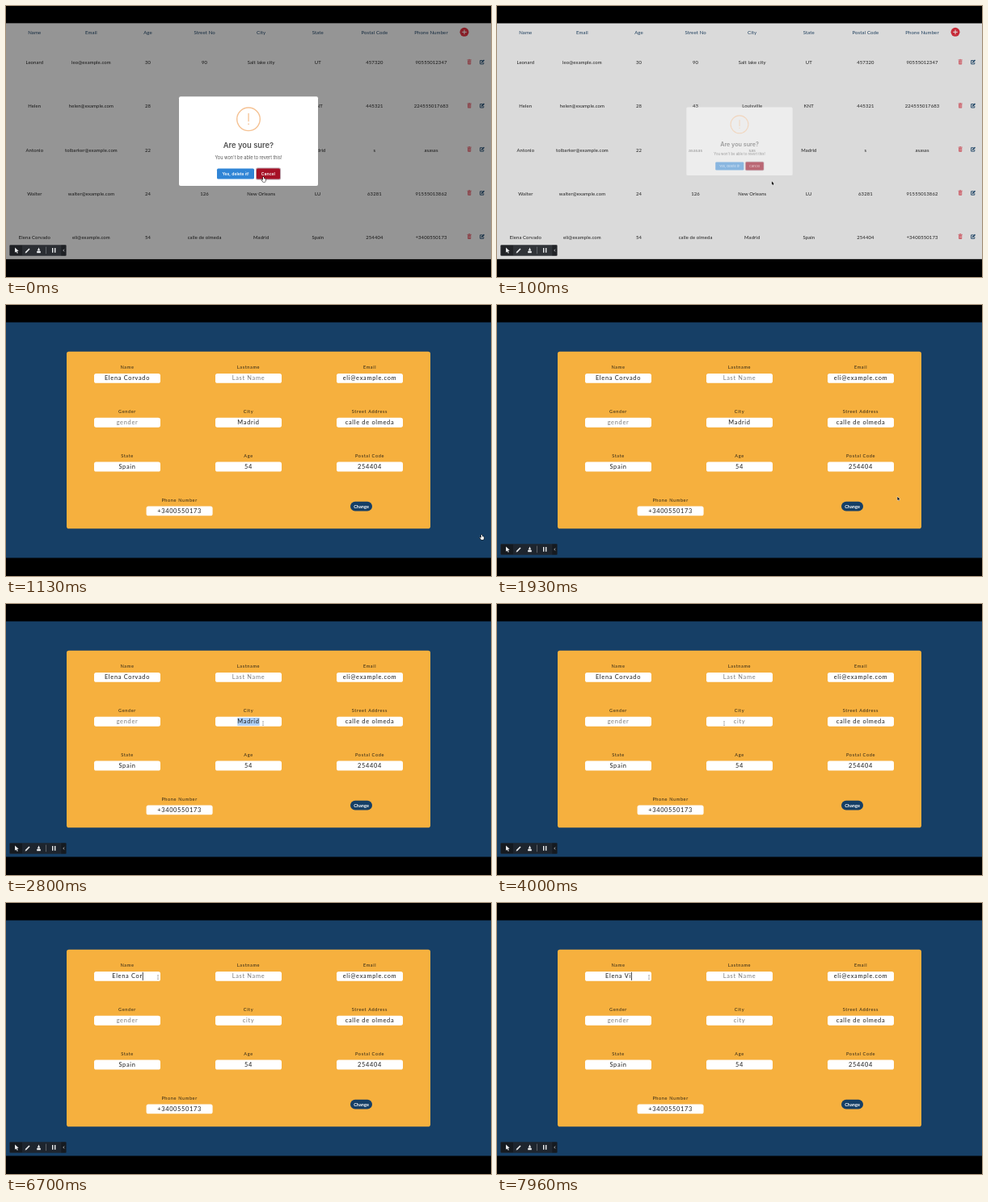
These frames come from a looping animation (600x336 px, 8 s). An HTML page with a canvas:

```html
<!DOCTYPE html>
<html lang="en">
<head>
<meta charset="utf-8">
<title>Contact list and edit form</title>
<style>
html, body { margin: 0; width: 100%; height: 100%; overflow: hidden; background: #000; }
canvas { display: block; width: 600px; height: 336px; }
</style>
</head>
<body>
<canvas id="stage"></canvas>
<script>
const LOOP = 8000, W = 600, H = 336;
const SANS = 'Lato, "Open Sans", sans-serif';
const UI = 'Inter, Roboto, sans-serif';
const NAVY = '#163f66', RED = '#e0303f', PAPER = '#f7f7f7';

const MODAL_OUT = 30, PAGE = 950, TOOLBAR_IN = 1500;
const SELECT = 2640, CLEAR = 3300, FOCUS_NAME = 5850;
const ERASE = 6250, ERASE_STEP = 115, TYPE = [7620, 7840];

const HEAD = ['Name', 'Email', 'Age', 'Street No', 'City', 'State', 'Postal Code', 'Phone Number'];
const PERSON = 'Elena Corvado', KEPT = 'Elena ', ADDED = 'Vi';
const MAIL = 'eli@example.com', STREET = 'calle de olmeda', PHONE = '+3400550173';
const ROWS = [
  ['Leonard', 'leo@example.com', '30', '90', 'Salt lake city', 'UT', '457320', '90555012347'],
  ['Helen', 'helen@example.com', '28', '43', 'Louisville', 'KNT', '445321', '224555017683'],
  ['Antonio', 'tolbarker@example.com', '22', 'asasas', 'sas', 'Madrid', 's', 'asasas'],
  ['Walter', 'walter@example.com', '24', '126', 'New Orleans', 'LU', '63281', '91555013862'],
  [PERSON, MAIL, '54', STREET, 'Madrid', 'Spain', '254404', PHONE]
];

// time, x, y of the pointer
const PATH = [
  [0, 318, 213], [30, 318, 213], [160, 358, 221], [480, 490, 257], [800, 588, 286],
  [1540, 588, 286], [1700, 571, 277], [2100, 440, 209], [2500, 318, 148],
  [3350, 318, 148], [3850, 281, 148], [4650, 281, 148], [5400, 183, 91],
  [6000, 183, 91], [6450, 188, 92], [8000, 188, 92]
];

const canvas = document.getElementById('stage');
const dpr = window.devicePixelRatio || 1;
canvas.width = W * dpr;
canvas.height = H * dpr;
const ctx = canvas.getContext('2d');

const clamp = v => Math.max(0, Math.min(1, v));

function rect(x, y, w, h, color) {
  ctx.fillStyle = color;
  ctx.fillRect(x, y, w, h);
}

function round(x, y, w, h, r, color) {
  ctx.fillStyle = color;
  ctx.beginPath();
  ctx.roundRect(x, y, w, h, r);
  ctx.fill();
}

function disc(x, y, r, color) {
  ctx.fillStyle = color;
  ctx.beginPath();
  ctx.arc(x, y, r, 0, Math.PI * 2);
  ctx.fill();
}

function trace(points, close) {
  ctx.beginPath();
  points.forEach(([x, y], i) => i ? ctx.lineTo(x, y) : ctx.moveTo(x, y));
  if (close) ctx.closePath();
}

function stroke(points, color, width, close) {
  trace(points, close);
  ctx.strokeStyle = color;
  ctx.lineWidth = width;
  ctx.stroke();
}

function shape(points, color) {
  trace(points, true);
  ctx.fillStyle = color;
  ctx.fill();
}

// Text centred on x, with its capitals centred on y; returns its width.
function text(str, x, y, size, color, { weight = 400, gap = 0, font = SANS } = {}) {
  ctx.font = `${weight} ${size}px ${font}`;
  ctx.letterSpacing = gap + 'px';
  ctx.textAlign = 'left';
  const w = ctx.measureText(str).width;
  ctx.fillStyle = color;
  ctx.fillText(str, x - w / 2, y + size * 0.36);
  return w;
}

function drawTrash(x, y) {
  const c = '#e4606c';
  round(x - 2, y - 1.9, 4, 5, 0.7, c);
  rect(x - 2.6, y - 2.9, 5.2, 0.8, c);
  rect(x - 0.9, y - 3.5, 1.8, 0.7, c);
  for (const d of [-1, 0, 1]) rect(x + d - 0.2, y - 1.1, 0.4, 3.3, '#fbdfe1');
}

function drawEdit(x, y) {
  const c = '#1f4a70';
  stroke([[x + 0.6, y - 1.9], [x - 2.4, y - 1.9], [x - 2.4, y + 2.5], [x + 1.8, y + 2.5], [x + 1.8, y + 0.5]], c, 0.9);
  stroke([[x - 0.8, y + 0.9], [x + 2.5, y - 2.4]], c, 1.5);
}

function drawTable() {
  rect(0, 21.5, W, 292.3, PAPER);
  HEAD.forEach((h, i) => text(h, 35.3 + i * 70.1, 32.5, 6, '#1f4568', { gap: 0.13 }));
  disc(567, 32.3, 5.5, RED);
  rect(564.2, 31.8, 5.6, 1, '#fff');
  rect(566.5, 29.5, 1, 5.6, '#fff');
  ROWS.forEach((row, r) => {
    const y = 70.2 + r * 54.1;
    row.forEach((cell, i) => text(cell, 35.3 + i * 70.1, y, 5.9, '#222', { gap: 0.13 }));
    drawTrash(573.2, y - 0.8);
    drawEdit(589, y - 0.8);
  });
}

function drawModal(t) {
  const p = clamp((t - MODAL_OUT) / 150);
  const shade = 0.4 * (1 - clamp((t - MODAL_OUT) / 100));
  rect(0, 21.5, W, 292.3, `rgba(0,0,0,${shade})`);
  if (p >= 1) return;
  ctx.save();
  ctx.globalAlpha = 1 - p;
  ctx.translate(300, 167.7);
  ctx.scale(1 - p / 2, 1 - p / 2);
  ctx.translate(-300, -167.7);
  round(214, 112.3, 172, 110.7, 2, '#fff');
  ctx.strokeStyle = '#f5c294';
  ctx.lineWidth = 1.4;
  ctx.beginPath();
  ctx.arc(300, 140.3, 14.3, 0, Math.PI * 2);
  ctx.stroke();
  rect(299.4, 133, 1.3, 10.3, '#f5c294');
  disc(300.05, 146.3, 0.85, '#f5c294');
  const ui = weight => ({ weight, font: UI });
  text('Are you sure?', 300, 172.8, 9.4, '#545454', ui(600));
  text("You won't be able to revert this!", 300, 188, 5.55, '#545454', ui(400));
  round(261, 201.6, 46, 13, 1.6, '#3085d6');
  round(309, 200.6, 31, 15, 2.2, '#b9a3ad');
  round(310, 201.6, 29, 13, 1.6, '#a61126');
  text('Yes, delete it!', 284, 208.1, 5.1, '#fff', ui(600));
  text('Cancel', 324.4, 208.1, 5.1, '#fff', ui(600));
  ctx.restore();
}

function drawCaret(x, y, since) {
  if (since % 1000 < 500) rect(x, y - 5, 0.8, 10, '#111');
}

function drawField(label, value, x, y, hint) {
  text(label, x, y - 13.4, 5.6, '#2b2314', { gap: 0.6 });
  round(x - 41, y - 5.9, 82, 11.9, 2.6, '#fff');
  return text(value || hint, x, y, 7.4, value ? '#1c1c1c' : '#7d7d7d', { gap: 0.7 });
}

function nameAt(t) {
  const extra = PERSON.length - KEPT.length;
  const gone = t < ERASE ? 0 : Math.min(extra, 1 + Math.floor((t - ERASE) / ERASE_STEP));
  const typed = TYPE.filter(at => t >= at).length;
  return PERSON.slice(0, PERSON.length - gone) + ADDED.slice(0, typed);
}

function lastNameKey(t) {
  const keys = [FOCUS_NAME, ...TYPE];
  for (let i = 0; i < PERSON.length - KEPT.length; i++) keys.push(ERASE + i * ERASE_STEP);
  return Math.max(...keys.filter(k => k <= t));
}

function drawForm(t) {
  rect(0, 21.5, W, 292, NAVY);
  round(75, 57.7, 450, 219.5, 2.8, '#f6b03e');
  const nameW = drawField('Name', nameAt(t), 150, 90.8);
  drawField('Lastname', '', 300, 90.8, 'Last Name');
  drawField('Email', MAIL, 450, 90.8);
  drawField('Gender', '', 150, 145.7, 'gender');
  const cityW = drawField('City', t < CLEAR ? 'Madrid' : '', 300, 145.7, 'city');
  drawField('Street Address', STREET, 450, 145.7);
  drawField('State', 'Spain', 150, 200.5);
  drawField('Age', '54', 300, 200.5);
  drawField('Postal Code', '254404', 450, 200.5);
  drawField('Phone Number', PHONE, 214.6, 255.3);
  round(426, 243.8, 27, 11.8, 5.9, NAVY);
  text('Change', 439.5, 249.8, 5.6, '#fff', { weight: 700 });

  if (t >= SELECT && t < CLEAR) {
    rect(300 - cityW / 2, 141, cityW, 9.8, '#aed0f7');
    text('Madrid', 300, 145.7, 7.4, '#1c1c1c', { gap: 0.7 });
  }
  if (t >= CLEAR && t < FOCUS_NAME) drawCaret(300, 145.7, t - CLEAR);
  if (t >= FOCUS_NAME) drawCaret(150 + nameW / 2, 90.8, t - lastNameKey(t));
}

function drawToolbar(alpha) {
  if (alpha <= 0) return;
  const c = '#e8eaec';
  ctx.save();
  ctx.globalAlpha = alpha;
  round(4.3, 296.3, 70.2, 13.4, 1.2, 'rgba(32,35,41,.9)');
  rect(5, 296.8, 15, 12.4, 'rgba(0,0,0,.3)');
  rect(68.3, 296.3, 6.2, 13.4, 'rgba(0,0,0,.3)');
  shape([[11, 299.4], [11, 305.8], [12.6, 304.4], [13.8, 306.8], [14.8, 306.3], [13.7, 304], [15.7, 303.8]], c);
  stroke([[24.7, 305.3], [29, 301]], c, 1.7);
  shape([[23.6, 306.4], [24.1, 304.5], [25.5, 305.9]], c);
  shape([[40.5, 299.4], [42.3, 303.4], [38.7, 303.4]], c);
  rect(38.2, 304, 4.6, 2.2, c);
  rect(49.3, 298.6, 0.7, 8.6, '#777b82');
  rect(57, 300, 1.4, 5.8, c);
  rect(60, 300, 1.4, 5.8, c);
  stroke([[72, 301.6], [70.8, 303], [72, 304.4]], c, 0.7);
  ctx.restore();
}

function pointerAt(t) {
  const i = Math.max(1, PATH.findIndex(k => k[0] > t));
  const [t0, x0, y0] = PATH[i - 1], [t1, x1, y1] = PATH[i];
  const p = (t - t0) / (t1 - t0);
  return [x0 + (x1 - x0) * p, y0 + (y1 - y0) * p];
}

function drawHand() {
  const hand = [[0, -1], [1, -1], [1.1, 1], [3.2, 1.5], [3.2, 3.6], [2.4, 5], [0, 5], [-1.8, 2.6], [-1.2, 2], [0, 2.8]];
  ctx.lineJoin = 'round';
  stroke(hand, '#222', 1.1, true);
  shape(hand, '#fff');
}

function drawArrow() {
  const arrow = [[0, 0], [0, 4.3], [1, 3.5], [1.7, 5], [2.4, 4.7], [1.8, 3.2], [3.1, 3.1]];
  stroke(arrow, '#fff', 1, true);
  shape(arrow, '#111');
}

function drawBeam() {
  const c = 'rgba(70,70,70,.6)';
  rect(-0.3, -2.4, 0.6, 4.8, c);
  for (const y of [-2.9, 2.4]) rect(-0.9, y, 1.8, 0.5, c);
}

function overInput(x, y) {
  return [150, 300, 450].some(cx => Math.abs(x - cx) < 41)
    && [90.8, 145.7, 200.5].some(cy => Math.abs(y - cy) < 6);
}

function drawPointer(t) {
  const [x, y] = pointerAt(t);
  ctx.save();
  ctx.translate(x, y);
  if (t < 60 || (t > 770 && t < 1560)) drawHand();
  else if (t > PAGE && overInput(x, y)) drawBeam();
  else drawArrow();
  ctx.restore();
}

function draw(t) {
  ctx.setTransform(dpr, 0, 0, dpr, 0, 0);
  rect(0, 0, W, H, '#000');
  if (t < PAGE) {
    drawTable();
    drawModal(t);
    drawToolbar(1);
  } else {
    drawForm(t);
    drawToolbar(clamp((t - TOOLBAR_IN) / 150));
  }
  drawPointer(t);
}

const start = performance.now();
function tick() {
  draw((performance.now() - start) % LOOP);
  requestAnimationFrame(tick);
}
tick();
</script>
</body>
</html>
```
